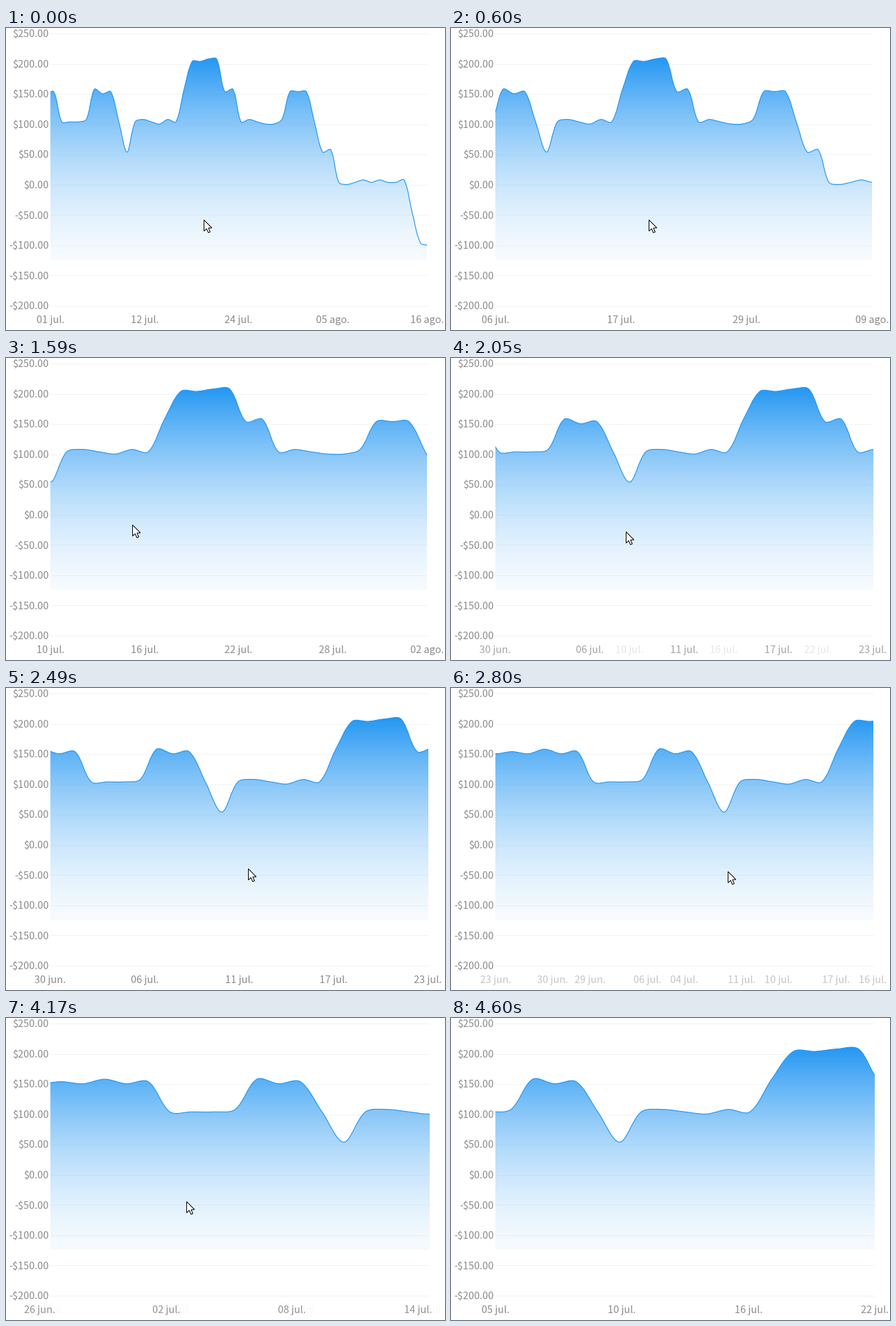
A matplotlib script that plays this animation: 633x435 px, repeating every 5080 ms.

```python
import math
import numpy as np
import matplotlib.pyplot as plt
from matplotlib.animation import FuncAnimation
from matplotlib.patches import PathPatch, Polygon, Rectangle
from matplotlib.path import Path

W, H, DPI = 633, 435, 64
LOOP, STEP = 5080, 20
FRAMES = LOOP // STEP
LEFT, TOP, BOTTOM, GRADIENT_END = 64, 41, 334, 400
BLUE = np.array([33, 150, 243]) / 255
PT = 72 / DPI

# The balance moves in $50 steps; day 0 is 10 July.
UP = [-4, 1, 7, 8, 20]
DOWN = [-8, -1, 0, 12, 14, 23, 24, 26, 35, 36]
# Days slightly above or below the usual level
HIGH = [-11, -5, -4, 2, 5, 7, 10, 11, 13, 15, 19, 25, 29, 31, 34]
LOW = [-14, -12, -10, -3, 4, 17, 18, 27, 37]
DAYS = np.arange(-19, 39)
DATE_OF_DAY_0 = 10.75

# Zooms (factor, centre) and pans (1, distance), with start, end,
# right edge of the plot and number of date labels
CHANGES = [
    (370, 600, 4 / 3, 285, 607, 4),
    (1030, 1300, 1.5, 285, 607, 5),
    (1890, 2130, 1, 247, 608.5, 5),
    (2710, 2950, 1, 164, 608.5, 5),
    (3370, 3570, 4 / 3, 394, 609, 4),
    (4170, 4410, 1, -259, 611, 4),
]
# Pointer moves: start, end, x, y, button held
POINTER_START = (285, 276)
POINTER_MOVES = [
    (1170, 1300, 149, 240, False),
    (1590, 1740, 396, 242, True),
    (1890, 2130, 235, 251, False),
    (2410, 2520, 399, 264, True),
    (3450, 3570, 519, 289, False),
    (3870, 3990, 260, 264, True),
    (4210, 4410, 563, 423, False),
]
POINTER_GONE = 4600
ARROW = np.array([(0, 0), (0, 16), (3.7, 12.6), (6.3, 18.3), (8.9, 17.2),
                  (6.4, 11.6), (11.3, 11.4)])


def balance(day):
    steps = sum(day >= d for d in UP) - sum(day >= d for d in DOWN)
    extra = 8 if day in HIGH else 0.5 if day in LOW else 4
    return 150 + 50 * steps + extra


def y_of(value):
    return 225.8 - 0.8711 * value


def money(value):
    return f"{'-' if value < 0 else ''}${abs(value):.2f}"


def date_label(date):
    """Text for a date counted from the end of June."""
    day = math.floor(date)
    if day < 1:
        return f"{day + 30:02d} jun."
    if day > 31:
        return f"{day - 31:02d} ago."
    return f"{day:02d} jul."


def make_views():
    """Each view: x of day 0, pixels per day, right edge, labels."""
    x0, scale = 174.5, 11.75
    views = [(x0, scale, 607, 5)]
    for _, _, factor, arg, right, count in CHANGES:
        x0 = x0 + arg if factor == 1 else arg + (x0 - arg) * factor
        scale *= factor
        views.append((x0, scale, right, count))
    return views


def view_at(t):
    """Old view, new view and the progress between them."""
    old, new, u = 0, 0, 1
    for i, (start, end, *_) in enumerate(CHANGES):
        if t >= start:
            n = int(6 * (t - start) / (end - start))
            u = 1 if n >= 6 else 1 - 0.942 * (1 - n / 10) ** 2.87
            old, new = i, i + 1
    return old, new, u


def pointer_at(t):
    pos = np.array(POINTER_START, float)
    for start, end, x, y, held in POINTER_MOVES:
        if t >= start:
            u = min(1, ((t - start) // 40 + 1) / (round((end - start) / 40) + 1))
            u = u ** 1.25 if held else 1 - (1 - u) ** 1.8
            pos += (np.array([x, y]) - pos) * u
    return np.round(pos)


def smooth_path(pts, smoothness=0.65):
    """Cubic path through pts, handles scaled by segment length."""
    ext = np.vstack([pts[:1], pts, pts[-1:]])
    mid = (ext[1:] + ext[:-1]) / 2
    size = np.hypot(*np.diff(ext, axis=0).T)
    k = (size[:-1] / (size[:-1] + size[1:]))[:, None]
    joint = mid[:-1] + (mid[1:] - mid[:-1]) * k
    out = pts[:-1] + smoothness * (mid[1:-1] - joint[:-1])
    into = pts[1:] + smoothness * (mid[1:-1] - joint[1:])
    curve = np.stack([out, into, pts[1:]], axis=1).reshape(-1, 2)
    return Path(np.vstack([pts[:1], curve]),
                [Path.MOVETO] + [Path.CURVE4] * len(curve))


def close_down(path):
    x0, x1 = path.vertices[0, 0], path.vertices[-1, 0]
    verts = np.vstack([path.vertices, [(x1, H), (x0, H), (x0, H)]])
    codes = list(path.codes) + [Path.LINETO, Path.LINETO, Path.CLOSEPOLY]
    return Path(verts, codes)


VIEWS = make_views()
LEVELS = y_of(np.array([balance(d) for d in DAYS]))

fig = plt.figure(figsize=(W / DPI, H / DPI), dpi=DPI, facecolor="white")
ax = fig.add_axes([0, 0, 1, 1])
ax.axis("off")
FONT = dict(family="Noto Sans CJK JP", size=14.5 * PT, color="#8c8c8c",
            va="baseline")

grid = []
for amount in range(-200, 251, 50):
    y = y_of(amount)
    grid += ax.plot([LEFT, 607], [y, y], color="#f2f2f2", lw=PT, zorder=1,
                    solid_capstyle="butt")
    ax.text(62, y + 5.2, money(amount), ha="right", **FONT)

# Blue fading to transparent white
rows = np.arange(TOP, BOTTOM) + 0.5
fade = ((rows - TOP) / (GRADIENT_END - TOP))[:, None]
shade = np.hstack([BLUE + (1 - BLUE) * fade, 1 - fade])[:, None, :]
area = ax.imshow(shade, extent=(LEFT, 607, BOTTOM, TOP), aspect="auto",
                 interpolation="nearest", zorder=2)
ax.set_autoscale_on(False)
ax.set_xlim(0, W)
ax.set_ylim(H, 0)

line = PathPatch(Path([(0, 0), (1, 1)]), fc="none", ec=BLUE, lw=1.15 * PT,
                 zorder=3)
ax.add_patch(line)
window = Rectangle((LEFT, 0), 543, H, transform=ax.transData)

old_labels, new_labels = [
    [ax.text(0, 425.2, "", ha="center", zorder=4, **FONT) for _ in range(5)]
    for _ in range(2)]
arrow = Polygon(ARROW, closed=True, fc="white", ec="black", lw=PT,
                joinstyle="miter", zorder=5)
ax.add_patch(arrow)


def place_labels(artists, view, alpha, x0, scale):
    """Dates of one view, placed on the scale given by x0 and scale."""
    own_x0, own_scale, right, count = VIEWS[view]
    spots = np.linspace(LEFT, right, count)
    for art in artists:
        art.set_visible(False)
    for art, x in zip(artists, spots):
        day = (x - own_x0) / own_scale
        art.set_text(date_label(DATE_OF_DAY_0 + day))
        art.set_x(x0 + day * scale)
        art.set_alpha(alpha)
        art.set_visible(alpha > 0)


def draw(i):
    t = (i % FRAMES + 1) * STEP
    old, new, u = view_at(t)
    x0, scale, right, _ = (a + (b - a) * u
                           for a, b in zip(VIEWS[old], VIEWS[new]))
    edge = VIEWS[new][2]

    path = smooth_path(np.column_stack([x0 + scale * DAYS, LEVELS]))
    line.set_path(path)
    window.set_width(edge - LEFT)
    line.set_clip_path(window)
    area.set_extent((LEFT, edge, BOTTOM, TOP))
    area.set_clip_path(close_down(path), ax.transData)
    for g in grid:
        g.set_xdata([LEFT, right])

    place_labels(new_labels, new, u, *VIEWS[new][:2])
    place_labels(old_labels, old, 1 - u, x0, scale)

    arrow.set_xy(ARROW + pointer_at(t) + 0.5)
    arrow.set_visible(t < POINTER_GONE)
    return []


def init():
    return draw(0)


anim = FuncAnimation(fig, draw, frames=FRAMES, init_func=init, interval=STEP,
                     repeat=True, repeat_delay=0, blit=False)
plt.show()
```
